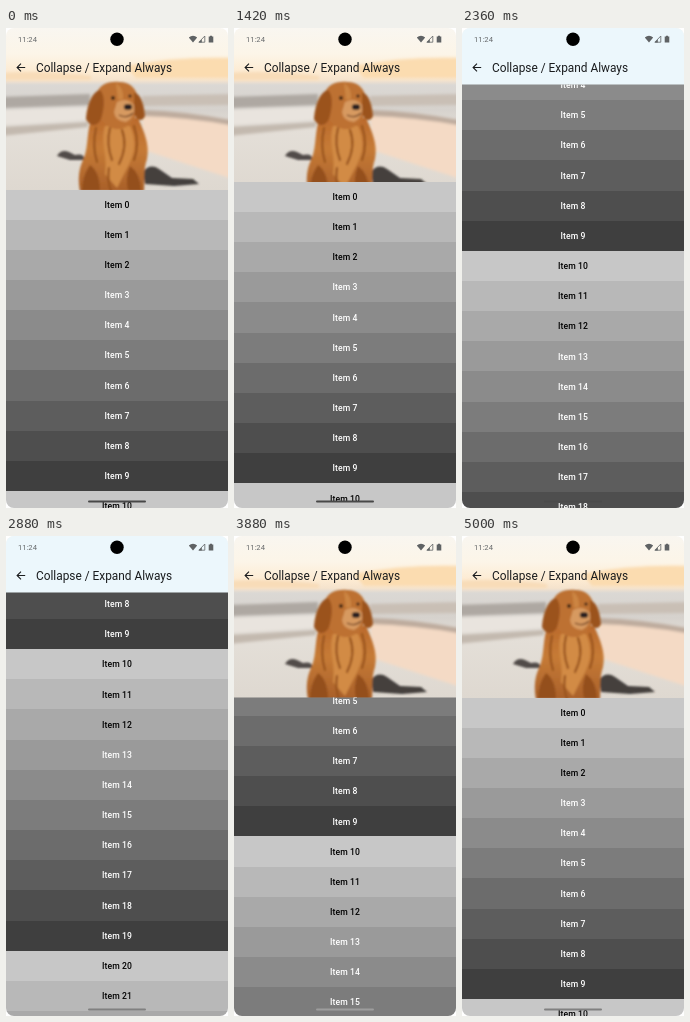
Recreate the animation shown at these times as an HTML page. Size 222x480 px, loop 5030 ms.

```html
<!DOCTYPE html>
<html lang="en">
<head>
<meta charset="utf-8">
<title>Collapsing header</title>
<style>
  html, body { margin: 0; width: 100%; height: 100%; overflow: hidden; background: #fff; }
  svg { display: block; width: 222px; height: 480px; font-family: Roboto, sans-serif; }
</style>
</head>
<body>
<svg viewBox="0 0 222 480">
  <defs>
    <clipPath id="screen"><rect width="222" height="480" rx="8"/></clipPath>
    <clipPath id="below"><rect id="window" width="222" height="480"/></clipPath>
    <linearGradient id="sky" x2="0" y2="1">
      <stop offset="0" stop-color="#f9f6f0"/>
      <stop offset=".16" stop-color="#fcf5e8"/>
      <stop offset=".27" stop-color="#fdebd2"/>
      <stop offset=".32" stop-color="#f5e3cd"/>
      <stop offset=".35" stop-color="#dbd8d4"/>
      <stop offset=".5" stop-color="#d6d2cd"/>
      <stop offset=".62" stop-color="#e4dfd8"/>
      <stop offset="1" stop-color="#ded8d0"/>
    </linearGradient>
    <linearGradient id="coat" x2="0" y2="1">
      <stop offset="0" stop-color="#b9682a"/>
      <stop offset=".45" stop-color="#c67b36"/>
      <stop offset="1" stop-color="#a9602a"/>
    </linearGradient>
    <filter id="soft" x="-20%" y="-50%" width="140%" height="200%"><feGaussianBlur stdDeviation="1.8"/></filter>
    <filter id="fur"><feGaussianBlur stdDeviation=".8"/></filter>
  </defs>

  <g clip-path="url(#screen)">
    <rect width="222" height="163" fill="url(#sky)"/>
    <g filter="url(#soft)">
      <path d="M120 38Q170 28 230 30V50H130Z" fill="#fbdcb0"/>
      <path d="M-5 45Q40 42 85 48V52H-5Z" fill="#f8dcb8"/>
      <path d="M-5 69L84 66V77L-5 80Z" fill="#aea8a2"/>
      <path d="M-5 82L84 79V92L-5 97Z" fill="#e9e4de"/>
      <path d="M-5 99L82 94V99L-5 108Z" fill="#c3b9af"/>
      <path d="M136 68L230 66V77L136 78Z" fill="#c9bfb5"/>
      <path d="M136 86Q180 87 230 98V152Q180 136 138 122Z" fill="#f4dac5"/>
      <path d="M136 82Q180 83 230 93V98Q180 89 136 88Z" fill="#bdab9d"/>
    </g>
    <g filter="url(#fur)">
      <path d="M51 128Q55 121 63 124L69 127Q78 125 79 132L64 132Z" fill="#514c48"/>
      <path d="M137 144Q144 135 153 141L166 150 187 151 193 156 168 158 139 156Z" fill="#45413e"/>
      <path d="M87 86C80 103 83 116 78 130C72 141 72 153 74 163H138C139 150 137 143 141 131C144 117 138 103 132 90Z" fill="url(#coat)"/>
      <path d="M99 98C94 114 102 127 99 146L111 160 120 142C130 125 130 111 124 98Z" fill="#d28b45"/>
      <path d="M84 137Q94 144 94 163H76Q76 148 84 137ZM124 138Q119 149 122 163H135Q135 146 124 138Z" fill="#94501f"/>
      <path d="M90 100Q86 118 91 134M104 100Q100 116 106 132M116 102Q122 118 113 136M128 98Q134 116 128 132M103 140Q101 152 105 163"
        fill="none" stroke="#98531f" stroke-width="2.2" stroke-linecap="round"/>
      <path d="M90 68C92 57 102 53 113 54C125 54 131 61 132 72C133 87 126 99 114 101C99 102 89 88 90 68Z" fill="#bd7132"/>
      <path d="M94 62C85 64 81 79 80 91C83 98 91 100 95 91C98 82 100 68 94 62ZM128 64C136 67 138 78 139 88C136 95 130 92 128 85Z" fill="#9b531f"/>
      <path d="M111 74Q121 69 128 77Q130 89 120 94Q109 93 108 84Z" fill="#d79a60"/>
      <path d="M110 55Q118 60 117 71L112 72Z" fill="#cc8543"/>
      <path d="M113 87Q121 91 127 85" fill="none" stroke="#63351d" stroke-width="1.2"/>
      <ellipse cx="122" cy="79" rx="4.2" ry="3.1" fill="#2b2020"/>
      <circle cx="107" cy="70" r="1.9" fill="#2d1b14"/>
      <circle cx="124" cy="68" r="1.6" fill="#2d1b14"/>
    </g>
    <rect id="scrim" width="222" height="163" fill="#ecf7fc"/>

    <g clip-path="url(#below)"><g id="list" font-size="8.64" font-weight="500" letter-spacing=".08" text-anchor="middle"></g></g>

    <text x="12" y="14" font-size="7.6" fill="#66696b">11:24</text>
    <circle cx="111" cy="11.2" r="6.7"/>
    <g fill="#5f6264">
      <path d="M182.8 9.6Q187 6 191.2 9.6L187 14.6Z"/>
      <path d="M192.8 14.2L198.8 8V14.2Z" fill="none" stroke="#5f6264" stroke-width=".8"/>
      <path d="M195.8 11.2V14.4H192.8Z"/>
      <path d="M202.7 8.6H204V7.8H206V8.6H207.3V14.6H202.7Z"/>
    </g>
    <path d="M19.2 39.5H11.2M15 35.6L11.1 39.5 15 43.4" fill="none" stroke="#1b1d1f" stroke-width="1.1"/>
    <text x="30" y="43.5" font-size="11.87" fill="#1a1c1e">Collapse / Expand Always</text>
    <rect id="handle" x="82" y="472.4" width="58" height="2" rx="1"/>
  </g>
</svg>
<script>
const LOOP = 5030, ROW = 30.15, MIN = 56.5, RANGE = 105, SCROLL = 244.8;
const $ = id => document.getElementById(id);

$('list').innerHTML = Array.from({ length: 24 }, (_, i) => {
  const k = i % 10, g = Math.round(199 - 15.1 * k), y = i * ROW;
  return `<rect y="${y}" width="222" height="${ROW + 1}" fill="rgb(${g},${g},${g})" shape-rendering="crispEdges"/>
    <text x="111" y="${y + 18.2}" fill="${k < 3 ? '#000' : '#fff'}">Item ${i}</text>`;
}).join('');

// Gesture keys: time in ms, distance in px, speed in px/ms
const up = [[1380, 0, .15], [1420, 7.5, .16], [2030, 119.8, .34], [2870, RANGE + SCROLL, 0]];
const down = [[3270, 0, .04], [3580, 39, .36], [4150, 306.8, .28], [4450, RANGE + SCROLL, 0]];

function travel(keys, t) {
  if (t <= keys[0][0]) return 0;
  const i = keys.findIndex(k => k[0] > t);
  if (i < 0) return keys.at(-1)[1];
  const [t0, p0, v0] = keys[i - 1], [t1, p1, v1] = keys[i];
  const d = t1 - t0, u = (t - t0) / d, w = 1 - u;
  return w * w * ((1 + 2 * u) * p0 + u * d * v0) + u * u * ((1 + 2 * w) * p1 - w * d * v1);
}

const ramp = (a, b, t) => {
  const u = Math.min(1, Math.max(0, (t - a) / (b - a)));
  return u * u * (3 - 2 * u);
};

function draw(now) {
  const t = now % LOOP, a = travel(up, t), b = travel(down, t);
  // The header collapses before the rows scroll, and expands before they return
  const head = MIN + RANGE - Math.min(RANGE, a) + Math.min(RANGE, b);
  const scroll = Math.max(0, a - RANGE) - Math.max(0, b - RANGE);
  $('window').setAttribute('y', head);
  $('list').setAttribute('transform', `translate(0 ${head - scroll})`);
  $('scrim').setAttribute('opacity', ramp(1880, 2260, t) - ramp(3310, 3540, t));
  // The handle lightens over dark rows and darkens again afterwards
  const g = 72 + 56 * (ramp(2300, 2850, t) + ramp(3600, 4150, t) - ramp(4400, 5000, t));
  $('handle').setAttribute('fill', `rgb(${g},${g},${g})`);
}

const start = performance.now();
function tick() {
  draw(performance.now() - start);
  requestAnimationFrame(tick);
}
tick();
</script>
</body>
</html>
```
